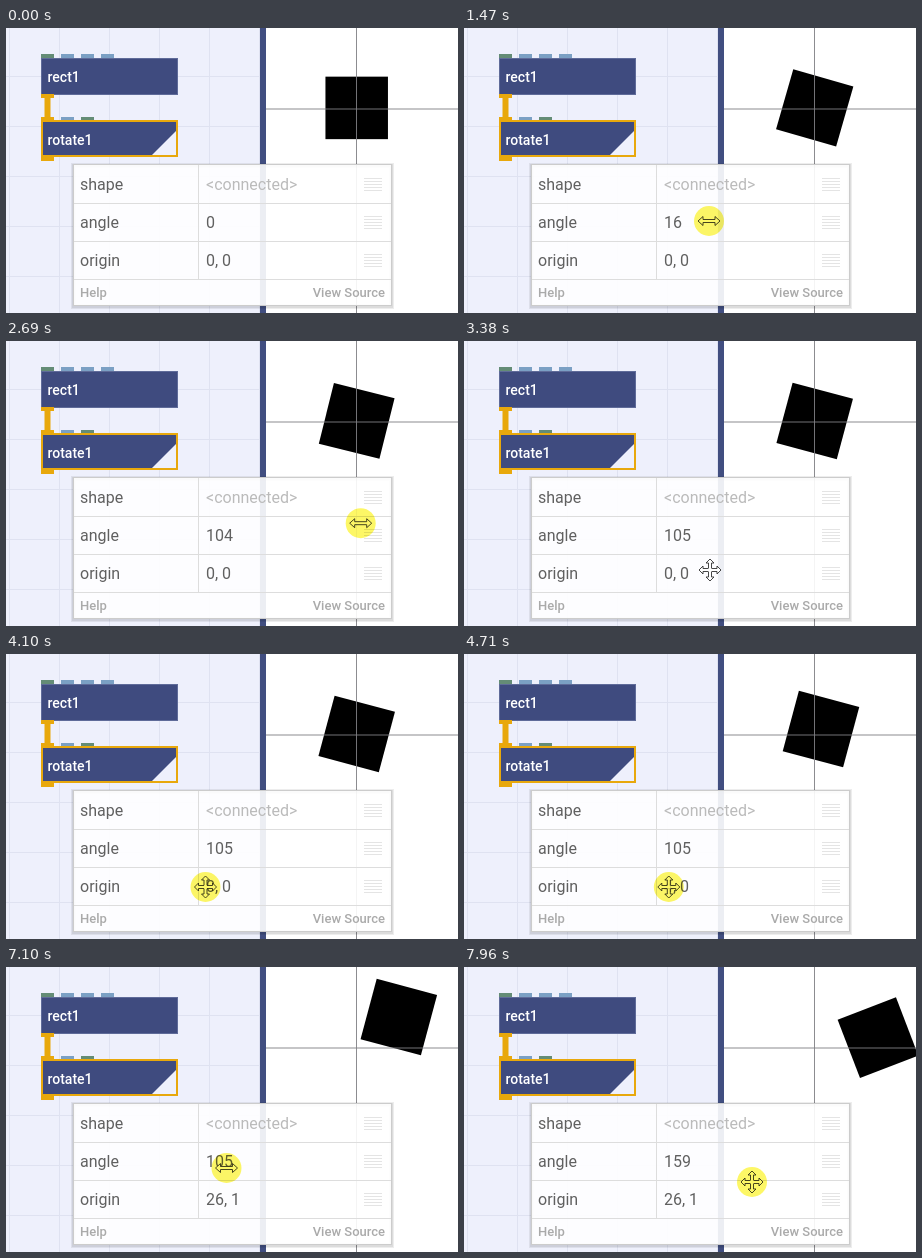
Write an HTML page that moves like this. It is 452 px wide and 285 px high and loops after 8000 ms.

```html
<!DOCTYPE html>
<html lang="en">
<head>
<meta charset="utf-8">
<title>Rotate node</title>
<style>
  html, body { margin: 0; width: 100%; height: 100%; overflow: hidden; background: #fff; }
  svg { display: block; width: 100%; height: 100%; }
  text { font: 16px Roboto, "Noto Sans", sans-serif; fill: #606060; }
  .node { font-size: 14px; font-weight: 500; fill: #fff; }
  .hint { fill: #bbb; }
  .foot { font-size: 13px; font-weight: 500; fill: #aaa; }
  .shadow { fill: none; stroke: #000; stroke-opacity: .07; }
  .panel { fill: #fff; fill-opacity: .9; stroke: #ccc; }
  .rule { stroke: #ddd; }
  .cursor { fill: #fff; stroke: #333; stroke-width: .9; }
  #press { fill: #fdf766; mix-blend-mode: multiply; }
</style>
</head>
<body>
<svg viewBox="0 0 452 285">
  <defs>
    <pattern id="grid" x="3" y="48" width="50" height="50" patternUnits="userSpaceOnUse">
      <path d="M.5 0V50M0 .5H50" stroke="#dfe2f1"/>
    </pattern>
    <path id="menu" d="M358 -5.5h18m-18 3h18m-18 3h18m-18 3h18m-18 3h18" stroke="#e4e4e4"/>
    <path id="port" d="M0 0h13v4h-13z"/>
    <path id="arm" d="M-1.500 -1.500V-7H-4L0 -11L4 -7H1.500V-1.500"/>
  </defs>

  <rect width="452" height="285" fill="#fff"/>
  <rect width="254" height="285" fill="#eef0fc"/>
  <rect width="254" height="285" fill="url(#grid)"/>

  <rect id="square" x="-25" y="-25" width="50" height="50"/>
  <path d="M350.500 0V285M260 81H452" stroke="#808084" stroke-opacity=".9"/>
  <rect x="254" width="6" height="285" fill="#414e80"/>

  <g fill="#7ba0c4">
    <use href="#port" x="55" y="26"/><use href="#port" x="75" y="26"/>
    <use href="#port" x="95" y="26"/><use href="#port" x="55" y="89"/>
  </g>
  <g fill="#648c76"><use href="#port" x="35" y="26"/><use href="#port" x="75" y="89"/></g>
  <g fill="#3f4b7f">
    <rect x="35.500" y="30.500" width="136" height="36" stroke="#5f6b99"/>
    <rect x="36" y="93" width="135" height="35" stroke="#e8a80c" stroke-width="2"/>
  </g>
  <path d="M146 127L170 103V127Z" fill="#eef0fc"/>
  <g fill="#e8a80c">
    <use href="#port" x="35" y="66"/><use href="#port" x="35" y="89"/><use href="#port" x="35" y="129"/>
    <rect x="38.500" y="68" width="6" height="23"/>
  </g>
  <text class="node" x="41.500" y="54">rect1</text>
  <text class="node" x="41.500" y="117">rotate1</text>

  <rect class="shadow" x="67.500" y="137.500" width="318" height="141" stroke-width="5"/>
  <rect class="shadow" x="67.500" y="137.500" width="318" height="141" stroke-width="3"/>
  <rect class="panel" x="67.500" y="136.500" width="318" height="141"/>
  <path class="rule" d="M68 175.500H385M68 213.500H385M68 251.500H385M192.500 137V251"/>
  <text x="74" y="162">shape</text>
  <text x="74" y="200">angle</text>
  <text x="74" y="238">origin</text>
  <text class="hint" x="200" y="162">&lt;connected&gt;</text>
  <text id="angle" x="200" y="200"></text>
  <text id="origin" x="200" y="238"></text>
  <use href="#menu" y="156"/><use href="#menu" y="194"/><use href="#menu" y="232"/>
  <text class="foot" x="74" y="269">Help</text>
  <text class="foot" x="379" y="269" text-anchor="end">View Source</text>

  <g id="pointer">
    <path class="cursor" id="arrow" d="M0 0V16L4 12.500L6.500 18L9 17L6.500 11.500H11.500Z"/>
    <path class="cursor" id="resize" d="M-11 0L-6 -4.500V-1.500H6V-4.500L11 0L6 4.500V1.500H-6V4.500Z"/>
    <g class="cursor" id="move">
      <use href="#arm"/><use href="#arm" transform="rotate(90)"/>
      <use href="#arm" transform="rotate(180)"/><use href="#arm" transform="rotate(270)"/>
      <rect x="-1.500" y="-1.500" width="3" height="3" stroke="none"/>
    </g>
  </g>
  <circle id="press" r="15"/>
</svg>
<script>
const LOOP = 8000, STEP = 77.2, ZOOM = 1.25;
const el = id => document.getElementById(id);
const show = (id, on) => el(id).setAttribute('visibility', on ? 'visible' : 'hidden');

const linear = u => u;
const smooth = u => u * u * (3 - 2 * u);
const easeIn = u => u ** 3;
const easeOut = power => u => 1 - (1 - u) ** power;

// Each move starts where the previous one ended; a drag also changes a value.
const moves = [
  { from: 380, to: 990, x: 225, y: 195, ease: smooth },
  { from: 1304, to: 2763, x: 356.25, y: 182, ease: easeOut(1.4), drags: 'angle', press: 1140, release: 2980 },
  { from: 2980, to: 3400, x: 246, y: 229, ease: smooth },
  { from: 3400, to: 3630, x: 199.5, y: 233, ease: smooth },
  { from: 4300, to: 5010, x: 227, y: 233, ease: easeIn, drags: 'origin', press: 3770, release: 5390 },
  { from: 5640, to: 5800, x: 232, y: 233, ease: smooth },
  { from: 5944, to: 6390, x: 237, y: 234.2, ease: easeOut(3), drags: 'origin', press: 5920, release: 6610 },
  { from: 6630, to: 7050, x: 220.5, y: 201, ease: smooth },
  { from: 7250, to: 7951, x: 288, y: 215, ease: linear, drags: 'angle', press: 7100, release: LOOP }
];

function stateAt(t) {
  const state = { x: 303, y: 283, angle: 0, originX: 0, originY: 0, pressed: false };
  for (const move of moves) {
    const u = Math.min(1, Math.max(0, (t - move.from) / (move.to - move.from)));
    const dx = (move.x - state.x) * move.ease(u), dy = (move.y - state.y) * move.ease(u);
    state.x += dx;
    state.y += dy;
    if (move.drags === 'angle') state.angle += dx / ZOOM;
    if (move.drags === 'origin') {
      state.originX += dx / ZOOM;
      state.originY += dy / ZOOM;
    }
    state.pressed ||= t >= move.press && t < move.release;
    if (u < 1) break;
  }
  return state;
}

function draw(now) {
  const t = Math.floor((now % LOOP + 20) / STEP) * STEP;
  const { x, y, pressed, ...values } = stateAt(t);
  const [angle, originX, originY] =
    [values.angle, values.originX, values.originY].map(Math.round);

  el('square').setAttribute('transform',
    `translate(350.7 79.9) scale(${ZOOM}) rotate(${angle} ${originX} ${originY})`);
  el('angle').textContent = angle;
  el('origin').textContent = `${originX}, ${originY}`;

  const kind = y > 251 ? 'arrow' : y > 213 ? 'move' : 'resize';
  for (const id of ['arrow', 'move', 'resize']) show(id, t > 380 && id === kind);
  show('press', pressed);
  for (const id of ['pointer', 'press'])
    el(id).setAttribute('transform', `translate(${x.toFixed(1)} ${y.toFixed(1)})`);
}

const start = performance.now();
function tick() {
  draw(performance.now() - start);
  requestAnimationFrame(tick);
}
tick();
</script>
</body>
</html>
```
